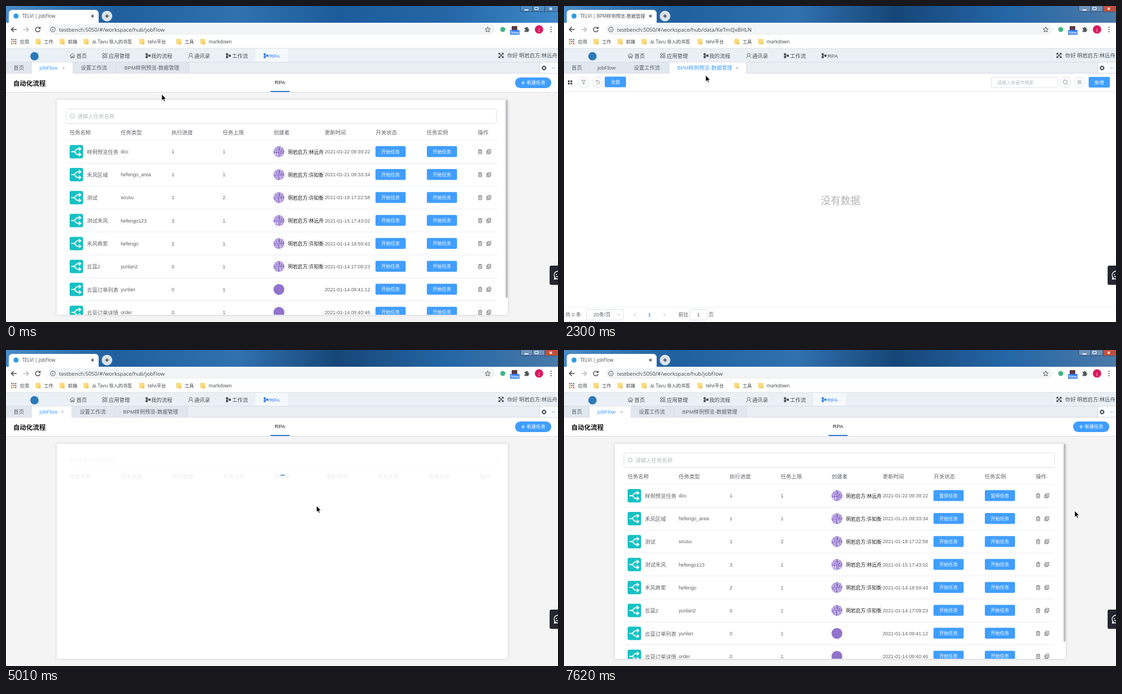
Write an HTML page with a canvas that moves like this. It is 989 px wide and 566 px high and loops after 8000 ms.

```html
<!DOCTYPE html>
<html lang="zh-CN">
<head>
<meta charset="utf-8">
<style>
html, body { margin: 0; width: 100%; height: 100%; overflow: hidden; background: #fff; }
canvas { display: block; }
</style>
</head>
<body>
<canvas id="stage" width="989" height="566"></canvas>
<script>
const ctx = document.getElementById('stage').getContext('2d');
const LOOP = 8000;
const APP = '"Liberation Sans", "Noto Sans CJK SC", "Noto Sans CJK", sans-serif';
const CHROME = '"Open Sans", "Noto Sans CJK SC", "Noto Sans CJK", sans-serif';
const BLUE = '#409eff', INK = '#606266', RULE = '#ebeef5', OUTLINE = '#dcdfe6', HINT = '#b4b8c0';
const PROJECT = 'BPM样例预览-数据管理';

const ramp = (t, a, b) => Math.min(1, Math.max(0, (t - a) / (b - a)));

function box(x, y, w, h, fill, r = 0, stroke) {
  ctx.beginPath();
  ctx.roundRect(x, y, w, h, r);
  if (fill) { ctx.fillStyle = fill; ctx.fill(); }
  if (stroke) { ctx.strokeStyle = stroke; ctx.lineWidth = 1; ctx.stroke(); }
}
const dot = (x, y, r, fill, stroke) => box(x - r, y - r, 2 * r, 2 * r, fill, r, stroke);

// y is the optical middle of the line
function text(s, x, y, size, color, { align = 'left', weight = 400, font = APP } = {}) {
  ctx.font = `${weight} ${size}px ${font}`;
  ctx.textAlign = align;
  ctx.fillStyle = color;
  ctx.fillText(s, x, y + size * 0.37);
}
const center = (s, x, y, size, color, weight) => text(s, x, y, size, color, { align: 'center', weight });
const ui = (s, x, y, size, color) => text(s, x, y, size, color, { font: CHROME });

function icon(d, x, y, { stroke, fill, width = 1 }) {
  const path = new Path2D(d);
  ctx.save();
  ctx.translate(x, y);
  if (fill) { ctx.fillStyle = fill; ctx.fill(path); }
  if (stroke) { ctx.strokeStyle = stroke; ctx.lineWidth = width; ctx.stroke(path); }
  ctx.restore();
}
const ring = (x, y, r) => `M${x - r} ${y}a${r} ${r} 0 1 1 ${2 * r} 0a${r} ${r} 0 1 1 ${-2 * r} 0`;

const ICON = {
  back: 'M5 0H-4M0-4.5L-4.5 0L0 4.5',
  forward: 'M-5 0H4M0-4.5L4.5 0L0 4.5',
  reload: 'M3.2-2.6A4.2 4.2 0 1 0 4.1 1M4.2-4.8V-1.6H1',
  star: 'M0-4.5L1.3-1.4L4.6-1.1L2.1 1.1L2.9 4.4L0 2.6L-2.9 4.4L-2.1 1.1L-4.6-1.1L-1.3-1.4Z',
  puzzle: 'M-4-2.5H-1.5A1.5 1.5 0 1 1 1.5-2.5H3V0A1.5 1.5 0 1 1 3 3V5H-4V2.5A1.4 1.4 0 0 0-4-.5Z',
  close: 'M-2-2L2 2M2-2L-2 2',
  home: 'M-4.5 0L0-4L4.5 0M-3-1V4H-1V1.5H1V4H3V-1',
  apps: ring(-2.4, -2.4, 1.8) + ring(2.4, -2.4, 1.8) + ring(-2.4, 2.4, 1.8) + ring(2.4, 2.4, 1.8),
  flow: 'M-4-4h3v3h-3zM-4 1h3v3h-3zM1-1.5h3v3h-3zM-2.5-2.5v5M-2.5 0h4',
  user: ring(0, -1.5, 2.6) + 'M-4 4.5A4.5 4.5 0 0 1-1.5 .9M4 4.5A4.5 4.5 0 0 0 1.5 .9',
  expand: 'M-4-4L4 4M4-4L-4 4M-4-1V-4H-1M1-4H4V-1M4 1V4H1M-1 4H-4V1',
  search: ring(0, -.4, 3.6) + 'M2.2 2.5L3.8 4.2',
  branch: 'M-9 0H-5C-1 0-1-5 2-5H7M-5 0C-1 0-1 5 2 5H7M4.5-8L8-5L4.5-2M4.5 2L8 5L4.5 8',
  trash: 'M-3.5-2.5H3.5M-1.3-2.5V-3.8H1.3V-2.5M-2.7-2.5V3.8H2.7V-2.5M-.9-.5V2M.9-.5V2',
  copy: 'M-1.8-3.8H3.6V2H-1.8ZM-1.8-1.6H-3.6V3.8H1.8V2M-.4-.9H2.2M.9-2.2V.4',
  funnel: 'M-3.5-3.5H3.5L1-.2V3.6L-1 2.6V-.2Z',
  undo: 'M-2.6-1.6A3 3 0 1 1-2.9 1.2M-3.2-3.8V-1.4H-.8',
  menu: 'M-3.5-2.5H3.5M-3.5 0H3.5M-3.5 2.5H3.5',
  down: 'M-2.8-1.4L0 1.4L2.8-1.4',
  left: 'M1.3-2.8L-1.5 0L1.3 2.8',
  right: 'M-1.3-2.8L1.5 0L-1.3 2.8',
  plus: 'M-3.2 0H3.2M0-3.2V3.2',
  arrow: 'M0 0V11.5L2.7 9.1L4.5 13.2L6.3 12.4L4.6 8.4H8Z',
  hand: 'M-1 .6Q0-1 1 .6V5L4.4 6Q5.5 6.4 5.2 8L4 13.5H-1.5L-4.4 9Q-4.6 7.2-3 7.7L-1 9Z'
};

// time, x, y of the pointer tip
const MOVES = [
  [0, 279, 158], [440, 279, 158], [1150, 258, 113], [1430, 257, 113], [1540, 259, 141],
  [1700, 261, 145], [2060, 255, 124], [2300, 254, 124], [2500, 222, 128], [2950, 425, 243],
  [3010, 425, 243], [3640, 128, 150], [3810, 98, 131], [3880, 98, 131], [4190, 76, 110],
  [4490, 76, 110], [5010, 556, 279], [5290, 640, 292], [5370, 640, 292], [6140, 680, 258],
  [6200, 680, 260], [6370, 682, 264], [7010, 682, 264], [7620, 915, 288], [LOOP, 915, 288]
];
function pointerAt(t) {
  const i = MOVES.findIndex(m => m[0] > t);
  const [t0, x0, y0] = MOVES[i - 1], [t1, x1, y1] = MOVES[i];
  const k = ramp(t, t0, t1);
  return { x: x0 + (x1 - x0) * k, y: y0 + (y1 - y0) * k };
}

function drawBrowser(t, onData) {
  const focused = t >= 1230;
  const sky = ctx.createLinearGradient(0, 0, 989, 12);
  [[0, '#4a8cc8'], [.2, '#1f5f9f'], [.42, '#3072b0'], [.6, focused ? '#164677' : '#1c5c9c'],
   [.8, '#2466a6'], [1, focused ? '#4a7aa8' : '#3f8acb']].forEach(s => sky.addColorStop(...s));
  box(0, 0, 989, 31, sky);

  box(922, -4, 67, 14, focused ? '#6f93b8' : '#4f88bf', 3, '#26486d');
  if (focused) box(966, -4, 26, 14, '#c0503c', 2);
  box(943, 0, 1, 10, '#26486d');
  box(965, 0, 1, 10, '#26486d');
  box(929, 6, 7, 2, '#fff');
  box(947.5, 2.5, 6, 4, null, 0, '#fff');
  icon(ICON.close, 976, 5, { stroke: '#fff', width: 1.6 });

  box(5, 7, 161, 30, '#fff', 6);
  dot(18, 18, 4.5, '#2c9be0');
  ui('TELVI | ' + (onData ? PROJECT : 'jobFlow'), 29, 18, 8.3, '#45494d');
  icon(ICON.close, 155, 18, { stroke: '#333', width: 1.2 });
  dot(181, 18, 9.5, '#dbe3ec');
  icon(ICON.plus, 181, 18, { stroke: '#333', width: 1.4 });

  box(0, 30, 989, 46, '#fff');
  box(75, 32.5, 800, 19, '#f1f3f4', 9.5);
  icon(ICON.back, 14, 42, { stroke: '#444', width: 1.4 });
  icon(ICON.forward, 36, 42, { stroke: '#b5b8bb', width: 1.4 });
  icon(ICON.reload, 57, 42, { stroke: '#444', width: 1.4 });
  icon(ring(0, 0, 4.2) + 'M0-.6V2.4M0-2.5V-1.5', 84, 42, { stroke: '#555' });
  ui('testbench:5050/#/workspace/hub/' + (onData ? 'data/KeTmQxBHLN' : 'jobFlow'), 95, 42, 9.6, '#45494d');
  icon(ICON.star, 863, 42, { stroke: '#555' });
  dot(890, 42, 4.5, '#41b883');
  box(906, 36, 10, 8, '#5b3a44', 1);
  box(903, 43, 17, 8.5, '#2d7ff0', 1.5);
  text('New', 911.5, 47, 7, '#fff', { align: 'center', weight: 600, font: CHROME });
  icon(ICON.puzzle, 933, 41.5, { fill: '#55595d' });
  dot(955, 42, 7.5, '#d81b60');
  text('j', 955, 42, 8, '#fff', { align: 'center', font: CHROME });
  [-4, 0, 4].forEach(d => dot(976.5, 42 + d, 1.1, '#444'));

  const palette = ['#d9443a', '#3f7fe0', '#3a9d57', '#e8a33a'];
  for (let i = 0; i < 9; i++) box(9 + i % 3 * 3.6, 59 + (i / 3 | 0) * 3.6, 2.3, 2.3, palette[i % 4]);
  ui('应用', 25, 64, 8.2, '#3c4043');
  [[53, '工作'], [96, '前端'], [139, '从 Tavu 导入的书签'], [239, 'telvi平台'], [305, '工具'], [348, 'markdown']]
    .forEach(([x, label]) => {
      box(x, 59, 9, 9.5, '#fbd97f', 1);
      box(x + 5, 65.5, 4, 3, '#f0bf52');
      ui(label, x + 15, 64, 8.3, '#3c4043');
    });
  box(0, 75.5, 989, 1, '#d3dbe4');
}

function drawNav(onTable) {
  box(0, 76.5, 989, 24, '#ebf0f6');
  dot(51, 90, 7.5, '#2b7bb9');
  if (onTable) box(447, 77, 58, 23, '#f6f9fc');
  [['home', 119, '首页', 126], ['apps', 177, '应用管理', 184], ['flow', 254.5, '我的流程', 260],
   ['user', 331, '通讯录', 337], ['flow', 398.5, '工作流', 405], ['flow', 466, 'RPA', 472]]
    .forEach(([name, ix, label, x]) => {
      const color = label === 'RPA' && onTable ? '#2f82ea' : '#4c5158';
      icon(ICON[name], ix, 89, { stroke: color, width: .9, fill: name === 'flow' && color });
      text(label, x, 89, 9.5, color);
    });
  icon(ICON.expand, 887, 88.5, { stroke: '#40454c', width: 1.1 });
  text('你好 明岩启方:林远舟', 898, 88.5, 9.4, '#4c5158');
}

function drawTabs(t, onData, pointer) {
  const jobOpen = 1 - ramp(t, 1600, 1800) + ramp(t, 4600, 5130);
  const dataOpen = ramp(t, 1440, 1640) - ramp(t, 4560, 4760);
  const hover = ramp(t, 1050, 1200) - ramp(t, 1540, 1750);
  const blueData = t > 1620 && t < 4620;
  box(0, 100, 989, 21, '#e9eef5');
  let x = 0;
  [['首页', 46, false, false, 0, 13.5], ['jobFlow', 65 + 9 * jobOpen, !onData, !blueData, jobOpen, 14],
   ['设置工作流', 78, false, false, 0, 14],
   [PROJECT, 129 + 9 * dataOpen, onData, blueData, Math.max(dataOpen, hover), 14 - 4.7 * hover]]
    .forEach(([label, w, active, blue, closable, pad]) => {
      const over = pointer.y < 121 && pointer.x > x && pointer.x < x + w;
      box(x, 100, w, 21, active ? '#fff' : '#e1e7ee');
      box(x + w - .5, 100, 1, 21, '#d0d8e2');
      if (!active) box(x, 120, w, 1, '#d6dde6');
      text(label, x + pad, 110.5, 9.4, blue || over ? BLUE : '#59616d');
      if (closable > .3) icon(ICON.close, x + w - 17, 111, { stroke: '#8fa3bd', width: .8 });
      x += w;
    });
  box(0, 100, 989, .8, '#d0d8e2');
  box(x, 120, 989 - x, 1, '#d3dae3');
  box(957, 101, 32, 19, '#fafbfc');
  box(956, 101, 1, 19, '#d3dae3');
  dot(964, 111, 4, '#40454c');
  icon(ICON.close, 964, 111, { stroke: '#fff', width: 1.2 });
  icon(ICON.down, 981, 111, { stroke: '#a0a6ae' });
}

const HEADERS = ['任务名称', '任务类型', '执行进度', '任务上限', '创建者', '更新时间', '开关状态', '任务实例', '操作'];
const LIN = '林远舟', XU = '许知衡';
const ROWS = [
  ['样例预览任务', 'doc', 1, 1, LIN, '22 09:39:22'],
  ['禾风区域', 'hefengo_area', 1, 1, XU, '21 09:33:34'],
  ['测试', 'sousu', 1, 2, XU, '18 17:22:58'],
  ['测试禾风', 'hefengo123', 3, 1, LIN, '15 17:43:02'],
  ['禾风商家', 'hefengo', 2, 1, XU, '14 18:59:43'],
  ['云篮2', 'yunlan2', 0, 1, XU, '14 17:09:23'],
  ['云篮订单列表', 'yunlan', 0, 1, '', '14 09:41:12'],
  ['云篮订单详情', 'order', 0, 1, '', '14 09:40:46']
];

function drawAvatar(owner, x, y) {
  dot(x, y, 9.7, '#9172cc');
  if (!owner) return;
  ctx.save();
  ctx.beginPath();
  ctx.arc(x, y, 9.7, 0, 7);
  ctx.clip();
  center('启方', x, y - 4.5, 9, '#fff');
  center(owner.slice(0, 2), x, y + 5.5, 9, '#fff');
  ctx.restore();
}

function drawRow(row, i, t, pointer) {
  const [name, type, progress, limit, owner, stamp] = row;
  const y = 261 + i * 41.1, col = n => 114 + n * 91.4;
  const over = Math.abs(pointer.y - y) < 20.5 && pointer.x > 107 && pointer.x < 879;
  if (over) box(107, y - 20, 772, 40.5, '#f7f7f8');
  box(107, y + 20, 772, 1, RULE);
  box(114, y - 12, 24, 24, '#17c1c3', 3);
  icon(ICON.branch, 126, y, { stroke: '#fff', width: 1.9 });
  text(name, 145, y + .5, 9.4, INK);
  text(type, col(1), y, 8.8, INK);
  text(progress, col(2), y, 8.8, INK);
  text(limit, col(3), y, 8.8, INK);
  drawAvatar(owner, 489, y);
  if (owner) text('明岩启方:' + owner, 505, y + .5, 8.8, '#222');
  text('2021-01-' + stamp, col(5), y, 8.75, INK);
  [662, 754].forEach(x => {
    const hot = over && pointer.x > x && pointer.x < x + 54 && Math.abs(pointer.y - y) < 10;
    const pressed = hot && t >= 6610;
    box(x, y - 10, 54, 19.5, pressed ? '#3a8ee6' : hot ? '#66b1ff' : BLUE, 2);
    center(i === 0 && t >= 7010 ? '暂停任务' : '开始任务', x + 27, y - .3, 8.2, '#fff', 500);
  });
  icon(ICON.trash, 849.5, y, { stroke: INK, width: .9 });
  icon(ICON.copy, 865, y, { stroke: INK, width: .9 });
}

function drawTablePage(t, pointer) {
  const loading = t > 4500 && t < 5400;
  const veil = t > 4500 ? .88 * (1 - ramp(t, 5400, 5650)) : 0;
  box(0, 121, 989, 445, '#f4f4f5');
  box(0, 121, 989, 33.5, '#fff');
  box(0, 154, 989, 1, '#d9dce0');
  text('自动化流程', 13, 138.5, 11.6, '#111', { weight: 700 });
  center('RPA', 491, 136, 9.5, '#222');
  box(474, 152, 34, 2, '#2f7fd6');
  box(912, 128, 65, 19, BLUE, 9.5);
  icon(ICON.plus, 926.5, 137.5, { stroke: '#fff' });
  text('新建任务', 933, 137, 8.3, '#fff', { weight: 500 });

  ctx.save();
  ctx.shadowColor = 'rgba(0,0,0,.16)';
  ctx.shadowBlur = 4;
  box(91, 168, 808, 385, '#fff', 2);
  ctx.restore();

  ctx.save();
  ctx.beginPath();
  ctx.rect(91, 168, 808, 385);
  ctx.clip();
  box(107.5, 184.5, 771, 26, '#fff', 3, OUTLINE);
  icon(ICON.search, 118.5, 197, { stroke: HINT });
  text('请输入任务名称', 128, 197.5, 9.5, HINT);
  HEADERS.forEach((label, i) =>
    text(label, 114 + i * (loading ? 91.9 : 91.4), 226, 9.5, INK, { weight: 500 }));
  box(107, 240, 772, 1, RULE);
  if (!loading) {
    ROWS.forEach((row, i) => drawRow(row, i, t, pointer));
    box(895, 168, 4, 355, '#c1c2c4', 2);
  }
  if (veil) box(91, 168, 808, 385, `rgba(255,255,255,${veil})`);
  if (loading) {
    const spin = (t - 5010) / 1000;
    ctx.beginPath();
    ctx.arc(496, 238, 14, -1.9 + spin * 3, -1.3 + spin * (spin < 0 ? 3 : 6));
    ctx.strokeStyle = '#3b8fc4';
    ctx.lineWidth = 1.5;
    ctx.stroke();
  }
  ctx.restore();
}

function drawDataPage() {
  box(0, 121, 989, 445, '#fff');
  box(0, 153, 989, 1, '#e1e5eb');
  [7, 11.5].forEach(x => [133.3, 137.5].forEach(y => box(x, y, 3.2, 3, '#40454c')));
  [['funnel', 35], ['undo', 61], ['search', 898], ['menu', 923.5]].forEach(([name, x]) => {
    dot(x, 136.5, 9.3, '#fff', OUTLINE);
    icon(ICON[name], x, 136.5, { stroke: '#7a7f88', width: .9 });
  });
  box(73, 126.5, 38, 19, BLUE, 2);
  center('全部', 92, 136, 8.4, '#fff', 500);
  box(765.5, 127.5, 119, 18.5, '#fff', 2, OUTLINE);
  text('请输入关键字搜索', 776, 136.5, 8.2, HINT);
  box(940, 127, 38, 19, BLUE, 2);
  center('新增', 959, 136.5, 8.4, '#fff', 500);
  center('没有数据', 495.5, 348.5, 17.7, '#b2b2b2');

  box(0, 539, 989, 1, RULE);
  text('共 0 条', 2.5, 553, 9, INK);
  box(40.5, 543.5, 66, 19, '#fff', 2, OUTLINE);
  text('20条/页', 53, 553, 9, INK);
  icon(ICON.down, 98, 553, { stroke: HINT });
  icon(ICON.left, 127, 553, { stroke: HINT });
  center('1', 153, 553, 9, BLUE, 700);
  icon(ICON.right, 179.5, 553, { stroke: HINT });
  text('前往', 205, 553, 9, INK);
  box(225.5, 543.5, 31, 19, '#fff', 2, OUTLINE);
  center('1', 241, 553, 9, INK);
  text('页', 259, 553, 9, INK);
}

function drawChat() {
  box(974, 465, 22, 34.5, '#24252f', 3);
  icon(ring(0, 0, 7) + 'M-6 4L-6.5 7.5L-2 6.5M-3.5 2Q0 4.5 3.5 2', 989, 482, { stroke: '#fff', width: 1.3 });
  dot(986, 481, 1, '#fff');
}

function draw(t) {
  const pointer = pointerAt(t);
  const onData = t >= 1480 && t < 4560;
  const dataAlpha = ramp(t, 1660, 1900) - ramp(t, 4620, 4740);
  const onTable = dataAlpha < .5;
  drawBrowser(t, onData);
  drawNav(onTable);
  drawTabs(t, onData, pointer);
  if (dataAlpha < 1) drawTablePage(t, pointer);
  if (dataAlpha > 0) {
    ctx.globalAlpha = dataAlpha;
    drawDataPage();
    ctx.globalAlpha = 1;
  }
  drawChat();
  if (t >= 1480 && t < 1760) {
    box(-3, 552, 332, 18, '#dee1e6', 3);
    ui('正在解析主机...', 3, 559.5, 8.2, '#4a4e52');
  }
  const overButton = dataAlpha === 0 && t > 5400 && Math.abs(pointer.y - 261) < 10
    && pointer.x > 662 && pointer.x < 716;
  const shape = pointer.y < 121 || overButton ? ICON.hand : ICON.arrow;
  icon(shape, pointer.x, pointer.y, { stroke: '#fff', fill: '#000', width: .8 });
}

function frame(now) {
  draw(now % LOOP);
  requestAnimationFrame(frame);
}
requestAnimationFrame(frame);
</script>
</body>
</html>
```
